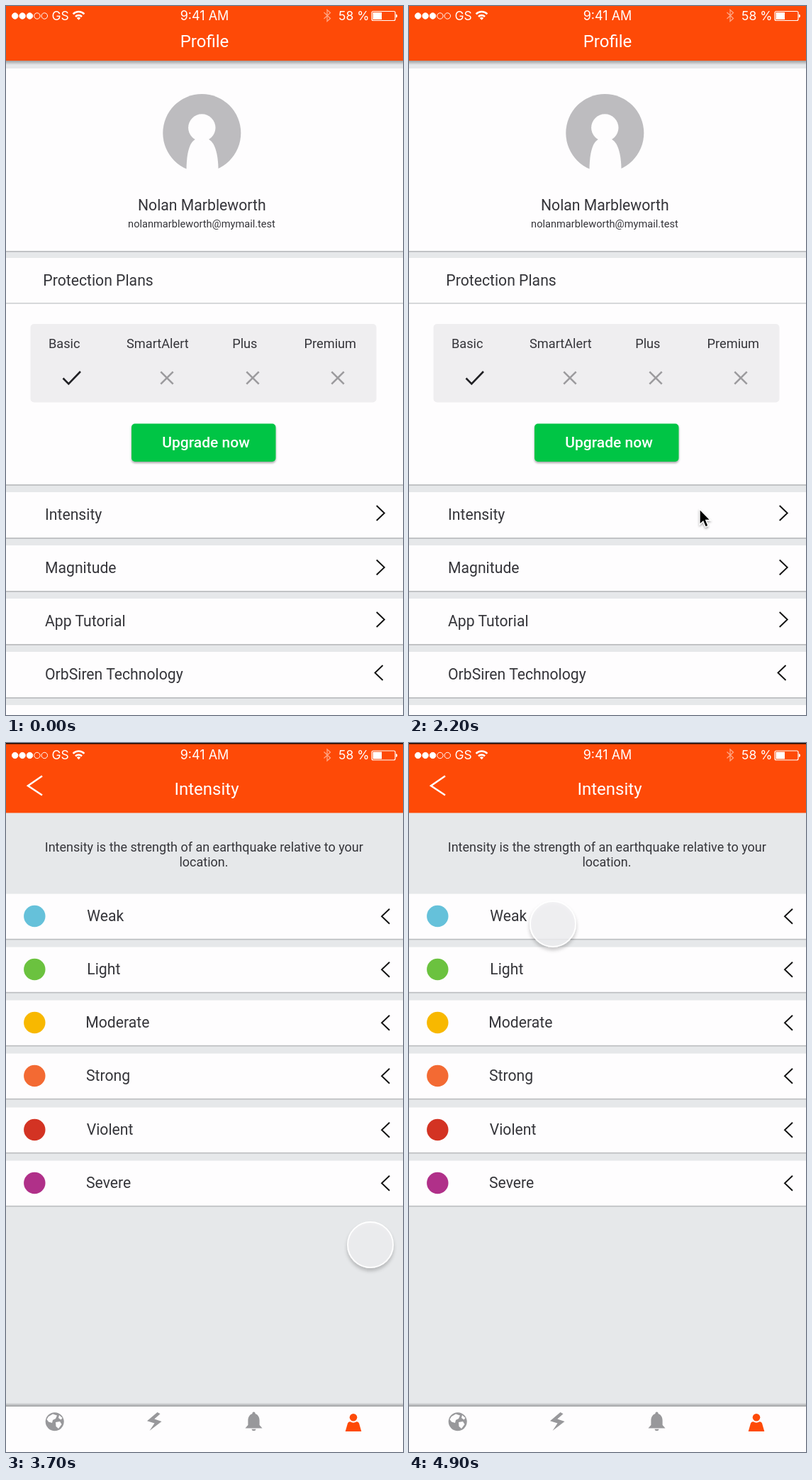
An HTML page that plays this animation: 560x999 px, repeating every 5 s.

```html
<!DOCTYPE html>
<html lang="en">
<head>
<meta charset="utf-8">
<title>Profile prototype</title>
<style>
  html, body { margin: 0; width: 100%; height: 100%; overflow: hidden; background: #e6e8ea; }
  svg { display: block; width: 100%; height: 100%; }
  text { font-family: Roboto, "Open Sans", sans-serif; fill: #35353a; }
  .bar text { font-family: Inter, "Liberation Sans", sans-serif; fill: #fff; }
  .title { fill: #fff; }
  .line { fill: none; stroke: #111; stroke-width: 1.9; }
</style>
</head>
<body>
<svg id="stage" viewBox="0 0 560 999" preserveAspectRatio="none">
  <defs>
    <filter id="soft" x="-30%" y="-30%" width="160%" height="170%">
      <feDropShadow dx="0" dy="2" stdDeviation="1.6" flood-color="#000" flood-opacity=".35"/>
    </filter>
    <filter id="lift" x="-30%" y="-30%" width="160%" height="170%">
      <feDropShadow dx="0" dy="4" stdDeviation="2.4" flood-color="#000" flood-opacity=".24"/>
    </filter>
    <linearGradient id="fade" x1="0" y1="0" x2="0" y2="1">
      <stop offset="0" stop-color="#000" stop-opacity=".32"/>
      <stop offset="1" stop-color="#000" stop-opacity="0"/>
    </linearGradient>
    <g id="status" class="bar">
      <g id="signal" stroke="#fff"></g>
      <text x="64.5" y="19.5" font-size="17.5">GS</text>
      <g fill="none" stroke="#fff" stroke-width="2.6">
        <path d="M94.6 11.3A11 11 0 0 1 110.4 11.3"/>
        <path d="M98 15A6.4 6.4 0 0 1 107 15"/>
      </g>
      <path d="M99.8 16.9A4 4 0 0 1 105.2 16.9L102.5 19.8Z" fill="#fff"/>
      <text x="280" y="19.5" font-size="18" text-anchor="middle">9:41 AM</text>
      <path d="M448.5 9L457.5 17.5L453 21.5V5.5L457.5 9.5L448.5 18" fill="none" stroke="#fff" stroke-opacity=".5" stroke-width="1.3"/>
      <text x="469" y="19.5" font-size="17.5">58 %</text>
      <rect x="516" y="7.5" width="33" height="13" rx="2" fill="none" stroke="#fff" stroke-width="1.2"/>
      <rect x="517.5" y="9" width="12.5" height="10" fill="#fff"/>
      <path d="M550 11.5Q552 11.7 552 14T550 16.5Z" fill="#fff"/>
    </g>
  </defs>

  <g id="profile">
    <rect width="560" height="999" fill="#e6e8ea"/>
    <g id="cards"></g>
    <rect y="77" width="560" height="6" fill="url(#fade)"/>
    <rect width="560" height="77" fill="#fe4a07"/>
    <use href="#status"/>
    <circle cx="276.3" cy="179" r="55" fill="#bdbcbf"/>
    <path d="M254.5 238V232C254.5 207 259 191 268 187.5H285C294 191 299.5 207 299.5 232V238Z" fill="#fefdfe"/>
    <circle cx="276.3" cy="171.5" r="19.2" fill="#fefdfe"/>
    <rect y="418" width="560" height="1.7" fill="#d0d2d4"/>
    <rect x="34.5" y="448" width="488" height="110.5" rx="5" fill="#efeef0"/>
    <path d="M80.5 524.5L88.3 532.5L105 515" fill="none" stroke="#202024" stroke-width="2.6"/>
    <g id="crosses" stroke="#9c9b9e" stroke-width="2.6"></g>
    <rect x="177" y="588.5" width="203.5" height="53.5" rx="5" fill="#00c545" filter="url(#soft)"/>
  </g>

  <g id="intensity">
    <rect width="560" height="999" fill="#e6e8ea"/>
    <rect width="560" height="98.5" fill="#fe4a07"/>
    <rect width="560" height="1.5" fill="#1a0a04"/>
    <use href="#status" y="3.5"/>
    <path d="M51 46.5L31 60.3L51 73.5" fill="none" stroke="#fff" stroke-width="2.5"/>
    <g id="levels"></g>
    <rect y="929.5" width="560" height="5.5" fill="url(#fade)" transform="matrix(1 0 0 -1 0 1864.5)"/>
    <rect y="935" width="560" height="64" fill="#fefdfe"/>
    <g fill="#98989b">
      <circle cx="68.7" cy="956.3" r="13"/>
      <path d="M60 949L66 945.5L72 947.5L70 952L66 954L65 958L60 956.5L57.5 953ZM70 957L76 956L78.5 960L74 966L70.5 963ZM75 947L79.5 951L77.5 953.5L74 951Z" fill="#fefdfe"/>
      <path d="M213.5 943L199 955.2L209.5 958.6L202.5 969L219.5 956L209.3 952.6L217.5 945.2Z"/>
      <path d="M349.5 942.5A2 2 0 0 1 351.5 945C356 946.5 357.6 950.5 357.6 955V961L361.5 965.5H337.5L341.4 961V955C341.4 950.5 343 946.5 347.5 945A2 2 0 0 1 349.5 942.5ZM346.3 966.8H352.7Q352 969.3 349.5 969.3T346.3 966.8Z"/>
    </g>
    <g fill="#fe4a07">
      <circle cx="490" cy="950.3" r="5.3"/>
      <path d="M478.7 970L482 958.5Q483 956.3 485.5 956.3Q490 959 494.5 956.3Q497 956.3 498 958.5L501.3 970Z"/>
    </g>
  </g>

  <g id="arrow" filter="url(#soft)">
    <path d="M0 0V21.5L4.9 17L8.2 25L12 23.4L8.7 15.5H15.2Z" fill="#000" stroke="#fff" stroke-width="1.3"/>
  </g>
  <g id="touch" filter="url(#lift)">
    <circle r="32" fill="#f1f0f3" fill-opacity=".8" stroke="#fff" stroke-width="1.8"/>
  </g>
</svg>

<script>
const $ = id => document.getElementById(id);

function add(parent, tag, attrs, text) {
  const el = document.createElementNS("http://www.w3.org/2000/svg", tag);
  for (const k in attrs) el.setAttribute(k, attrs[k]);
  if (text) el.textContent = text;
  parent.appendChild(el);
  return el;
}

const label = (parent, x, y, size, text, more) =>
  add(parent, "text", { x, y, "font-size": size, ...more }, text);

const centred = { "text-anchor": "middle" };

function card(parent, top, bottom) {
  add(parent, "rect", { y: bottom, width: 560, height: 1.8, fill: "#bdbfc1" });
  add(parent, "rect", { y: top, width: 560, height: bottom - top, fill: "#fefdfe" });
}

// dir is 1 for a chevron pointing right, -1 for left
function chevron(parent, x, y, dir) {
  const dx = 11 * dir;
  add(parent, "path", { class: "line", d: `M${x} ${y - 10.5}l${dx} 10.5l${-dx} 10.5` });
}

function buildProfile() {
  const p = $("profile"), cards = $("cards");
  [[88, 345], [355, 674], [685, 749], [760, 824], [835, 899], [910, 974], [985, 999]]
    .forEach(([top, bottom]) => card(cards, top, bottom));
  label(p, 280, 58, 24, "Profile", { ...centred, class: "title" });
  label(p, 276.3, 288, 21.2, "Nolan Marbleworth", centred);
  label(p, 276, 312, 14.6, "nolanmarbleworth@mymail.test", centred);
  label(p, 52.3, 394, 21.2, "Protection Plans");
  [["Basic", 60], ["SmartAlert", 170], ["Plus", 319.2], ["Premium", 420.6]]
    .forEach(([name, x]) => label(p, x, 482, 18.2, name));
  for (const x of [227, 348, 468])
    add($("crosses"), "path", { d: `M${x - 8.7} 515.3l17.4 17.4m0 -17.4l-17.4 17.4` });
  label(p, 220.3, 622, 21, "Upgrade now", { "font-weight": 500, style: "fill:#fff" });
  ["Intensity", "Magnitude", "App Tutorial", "OrbSiren Technology"].forEach((name, i) => {
    label(p, 55, 723.7 + 75 * i, 21.2, name);
    if (i < 3) chevron(p, 522.7, [714.5, 791, 864.5][i], 1);
    else chevron(p, 531.5, 939.5, -1);
  });
}

function buildIntensity() {
  const p = $("levels");
  label(p, 283, 73, 24, "Intensity", { ...centred, class: "title" });
  label(p, 279.3, 153, 18, "Intensity is the strength of an earthquake relative to your", centred);
  label(p, 279, 174, 18, "location.", centred);
  [
    ["Weak", "#65c1da", 244, 114.3], ["Light", "#6bc23f", 319, 114.3],
    ["Moderate", "#f8b800", 394, 112.2], ["Strong", "#f36a33", 469, 113],
    ["Violent", "#d33323", 545, 113.7], ["Severe", "#b03089", 620, 113]
  ].forEach(([name, color, y, x]) => {
    card(p, y - 31.5, y + 31.7);
    add(p, "circle", { cx: 40.3, cy: y, r: 15.2, fill: color });
    label(p, x, y + 6.5, 21.2, name);
    chevron(p, 541, y + .3, -1);
  });
  [["Feed", 68.5], ["Weather", 209], ["Notifications", 349.5], ["Profile", 490.3]]
    .forEach(([name, x], i) => label(p, x, 992, 17, name,
      { ...centred, style: `fill:${i == 3 ? "#fe4a07" : "#98989b"}` }));
}

function buildSignal() {
  for (let i = 0; i < 5; i++)
    add($("signal"), "circle", { cx: 12.7 + 10.4 * i, cy: 14, r: 4.2, fill: i < 3 ? "#fff" : "none" });
}

// time, x, y
const arrowPath = [
  [500, 446, 748], [600, 408, 727], [700, 370, 713], [900, 268, 708], [1100, 172, 706],
  [1300, 127, 706], [1600, 124, 706], [1800, 128, 706], [2000, 236, 708],
  [2200, 410, 709], [2400, 510, 708], [2600, 525, 709]
];
const touchPath = [
  [3600, 525.5, 711], [3700, 514, 707], [3800, 474, 695], [3900, 406, 668], [4000, 332, 633],
  [4100, 273, 583], [4200, 238, 464], [4300, 216, 350], [4400, 207, 290],
  [4600, 204, 263], [4900, 203, 255]
];

function at(path, t) {
  if (t <= path[0][0]) return path[0].slice(1);
  for (let i = 1; i < path.length; i++) {
    const [t0, x0, y0] = path[i - 1], [t1, x1, y1] = path[i];
    if (t <= t1) {
      const k = (t - t0) / (t1 - t0);
      return [x0 + (x1 - x0) * k, y0 + (y1 - y0) * k];
    }
  }
  return path[path.length - 1].slice(1);
}

const show = (el, on) => el.setAttribute("visibility", on ? "visible" : "hidden");
const move = (el, pos) => el.setAttribute("transform", `translate(${pos})`);

const LOOP = 5000, STEP = 100, SWITCH = 3000;
let start;

function draw(now) {
  start ??= now;
  const t = Math.floor((now - start) % LOOP / STEP) * STEP;
  show($("profile"), t < SWITCH);
  show($("intensity"), t >= SWITCH);
  show($("arrow"), t >= 500 && t < 2900);
  show($("touch"), t >= 2900);
  move($("arrow"), at(arrowPath, t));
  move($("touch"), at(touchPath, t));
  $("touch").setAttribute("opacity", t < SWITCH ? .4 : 1);
  requestAnimationFrame(draw);
}

buildSignal();
buildProfile();
buildIntensity();
draw(performance.now());
</script>
</body>
</html>
```
